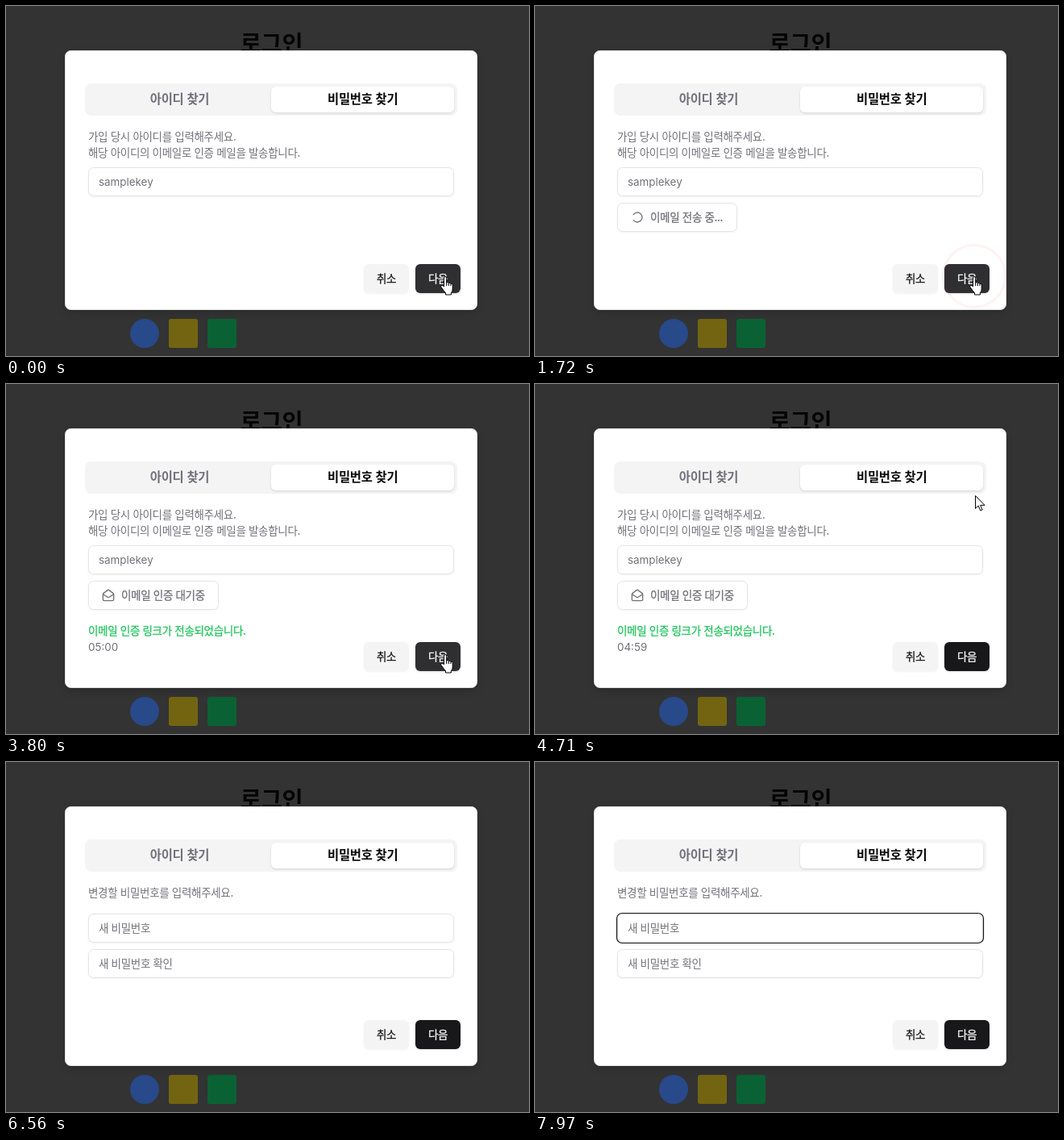
Recreate the animation shown at these times as an HTML page. Size 649 by 434 pixels, loop 8 s.

```html
<!DOCTYPE html>
<html lang="ko">
<head>
<meta charset="utf-8">
<style>
  html, body { margin: 0; width: 100%; height: 100%; overflow: hidden; background: #333; }
  svg { display: block; }
  text { font: 13.5px "Noto Sans CJK KR", "Noto Sans CJK", sans-serif; letter-spacing: -.31px; fill: #71717a; }
  .latin { font: 13.4px Inter, sans-serif; letter-spacing: 0; }
  .mid { stroke: currentColor; stroke-width: .28px; fill: currentColor; }
  .tab { font-size: 15.4px; font-weight: 700; letter-spacing: -.3px; }
  .c { text-anchor: middle; }
  .box { fill: #fff; stroke: #e4e4e7; }
  .icon { fill: none; stroke: #71717a; stroke-width: 2; stroke-linecap: round; stroke-linejoin: round; }
  .soft { filter: drop-shadow(0 1px 1px #0000000d); }
  .raised { filter: drop-shadow(0 1px 1px #0002); }
  .modal { filter: drop-shadow(0 4px 5px #0002); }
  .cursor { fill: #fff; stroke: #000; stroke-linejoin: round; }
</style>
</head>
<body>
<svg width="649" height="434" viewBox="0 0 649 434">
  <defs><clipPath id="pane"><rect x="98" y="140" width="461" height="170"/></clipPath></defs>
  <rect width="649" height="434" fill="#333"/>
  <text class="c" x="329.5" y="56.5" style="font-size:28.4px;font-weight:700;fill:#050505">로그인</text>
  <circle cx="172" cy="406" r="18" fill="#28498a"/>
  <rect x="202" y="388" width="36" height="36" rx="3" fill="#736411"/>
  <rect x="250" y="388" width="36" height="36" rx="3" fill="#0a6234"/>

  <rect class="box modal" x="73.5" y="55.5" width="511" height="321" rx="7"/>
  <rect x="98" y="96" width="462" height="40" rx="8" fill="#f4f4f5"/>
  <rect class="raised" x="329" y="100" width="227" height="32" rx="6" fill="#fff"/>
  <text class="tab c" x="215.5" y="121">아이디 찾기</text>
  <text class="tab c" x="442.7" y="121" style="fill:#09090b">비밀번호 찾기</text>

  <g id="request">
    <text x="102" y="167">가입 당시 아이디를 입력해주세요.</text>
    <text x="102" y="187">해당 아이디의 이메일로 인증 메일을 발송합니다.</text>
    <rect class="box soft" x="102.5" y="200.5" width="453" height="35" rx="6"/>
    <text class="latin" x="115" y="223">samplekey</text>
    <g id="mail">
      <rect id="mailBox" class="box soft" x="102.5" y="244.5" width="148" height="35" rx="6"/>
      <g class="icon">
        <path id="spinner" d="M21 12a9 9 0 1 1-6.219-8.56"/>
        <path id="envelope" transform="translate(119 254) scale(.6667)" d="M21.2 8.4c.5.38.8.97.8 1.6v10a2 2 0 0 1-2 2H4a2 2 0 0 1-2-2V10a2 2 0 0 1 .8-1.6l8-6a2 2 0 0 1 2.4 0l8 6ZM22 10l-8.97 5.7a1.94 1.94 0 0 1-2.06 0L2 10"/>
      </g>
      <text id="mailText" class="mid" x="143" y="267" color="#71717a"></text>
    </g>
    <g id="sent">
      <text class="mid" x="102" y="311" color="#22c55e">이메일 인증 링크가 전송되었습니다.</text>
      <text id="timer" class="latin" x="102" y="331"></text>
    </g>
  </g>

  <g clip-path="url(#pane)">
    <g id="reset">
      <text x="102" y="167">변경할 비밀번호를 입력해주세요.</text>
      <rect class="box soft" x="102.5" y="188.5" width="453" height="35" rx="6"/>
      <rect id="focus" x="101.5" y="187.5" width="455" height="37" rx="6.5" fill="none" stroke="#18181b" stroke-width="1.2"/>
      <text x="115" y="211">새 비밀번호</text>
      <path id="caret" d="M115.5 198v16" stroke="#555"/>
      <rect class="box soft" x="102.5" y="232.5" width="453" height="35" rx="6"/>
      <text x="115" y="255">새 비밀번호 확인</text>
    </g>
  </g>

  <rect class="soft" x="444" y="320" width="56" height="36" rx="6" fill="#f4f4f5"/>
  <text class="mid c" x="472" y="343" color="#18181b">취소</text>
  <rect id="next" class="raised" x="508" y="320" width="56" height="36" rx="6"/>
  <text class="mid c" x="536" y="343" color="#fafafa">다음</text>

  <circle id="ring" fill="none" stroke="#f61c1c" stroke-width="3"/>
  <g id="pointer">
    <path id="hand" class="cursor" transform="translate(-7 0)" d="M4.5 13V2.2a1.6 1.6 0 0 1 3.2 0V8q1.6-1.2 2.6.6 1.7-1 2.6.7 2.2-.7 2.3 1.4V16q0 3-1.8 4.5V23H6.5v-2.2Q4 18 1 13.6q-1-2 .8-2.4Q3 11 4.5 13zM7.7 8v4M10.3 8.6v3.4M12.9 9.3V12"/>
    <path id="arrow" class="cursor" d="M.5.5V16.5L4.2 13l2.6 6 2.4-1-2.6-5.7H12z"/>
    <path id="beam" fill="none" stroke="#000" d="M-3-7.5H-.5M1.5-7.5H4M.5-7V7M-3 7.5H-.5M1.5 7.5H4"/>
  </g>
</svg>
<script>
const $ = id => document.getElementById(id);
const show = (id, on) => $(id).style.display = on ? '' : 'none';
const set = (id, attrs) => { for (const k in attrs) $(id).setAttribute(k, attrs[k]); };
const span = (t, from, to) => Math.min(1, Math.max(0, (t - from) / (to - from)));
const easeOut = u => 1 - (1 - u) ** 1.7;
const smooth = u => u * u * (3 - 2 * u);

const LOOP = 8000, SPIN = 1125, SENT = 3490, RESET = 5320, CLICKS = [990, 6984];
const BUTTON = [545.5, 335], FIELD = [500.5, 214], EXIT = [508, -24];
// each move: start, end, from, bend, to
const MOVES = [
  [4270, 5040, BUTTON, [575, 200], EXIT],
  [6540, 6960, [652, 258], [575, 250], FIELD],
  [7370, 7940, FIELD, [496, 110], EXIT]
];

function pointerAt(t) {
  const [start, end, a, b, c] = MOVES.findLast(m => t >= m[0]) || MOVES[0];
  const u = smooth(span(t, start, end)), v = 1 - u;
  return a.map((p, i) => v * v * p + 2 * u * v * b[i] + u * u * c[i]);
}

function draw(t) {
  const resetting = t >= RESET, sent = t >= SENT;
  show('request', !resetting);
  show('mail', t >= SPIN);
  show('spinner', !sent);
  show('envelope', sent);
  set('mailBox', { width: sent ? 161 : 148 });
  set('spinner', { transform: `translate(127 262) rotate(${(t - SPIN) * .36}) scale(.6667) translate(-12 -12)` });
  $('mailText').textContent = sent ? '이메일 인증 대기중' : '이메일 전송 중...';
  set('sent', { opacity: easeOut(span(t, SENT, SENT + 300)) });
  $('timer').textContent = t < SENT + 1000 ? '05:00' : '04:59';

  const slide = easeOut(span(t, RESET, RESET + 300));
  show('reset', resetting);
  set('reset', { opacity: slide, transform: `translate(${50 * (1 - slide)} 0)` });
  const focused = t - CLICKS[1];
  show('focus', focused >= 0);
  show('caret', focused >= 0 && focused % 1000 < 500);

  const [x, y] = pointerAt(t);
  const onButton = x > 508 && x < 564 && y > 320 && y < 356;
  const top = resetting ? 188 : 200;
  const onField = x < 556 && y > top && y < top + 36;
  set('pointer', { transform: `translate(${Math.round(x)} ${Math.round(y)})` });
  show('hand', onButton);
  show('beam', onField);
  show('arrow', !onButton && !onField);
  set('next', { fill: onButton ? '#2f2f32' : '#18181b' });

  const second = t >= CLICKS[1];
  const p = span(t, CLICKS[+second], CLICKS[+second] + 760);
  const [cx, cy] = second ? [500, 214] : [545, 335];
  show('ring', p > 0 && p < 1);
  set('ring', { cx, cy, r: 40 * p, opacity: 1 - p ** 1.5 });
}

function tick() {
  draw(performance.now() % LOOP);
  requestAnimationFrame(tick);
}
tick();
</script>
</body>
</html>
```
